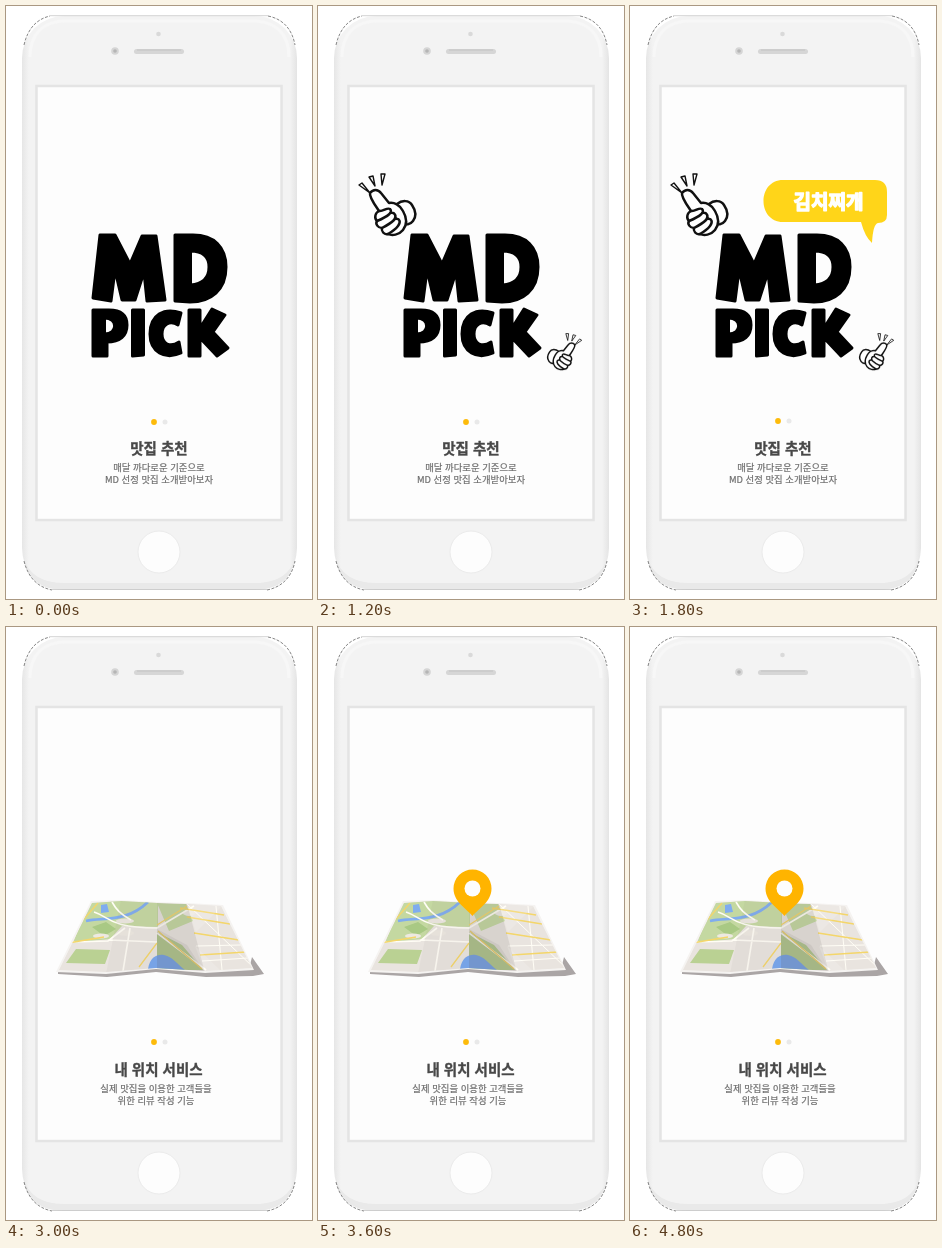
An HTML page for the animation above (5400 ms loop, 306 by 593 pixels).

```html
<!DOCTYPE html>
<html lang="ko">
<head>
<meta charset="utf-8">
<title>MD PICK</title>
<style>
html, body { margin: 0; width: 100%; height: 100%; overflow: hidden; background: #fff; }
svg { display: block; width: 306px; height: 593px; }
text { font-family: "Noto Sans CJK KR", "Noto Sans CJK", sans-serif; text-anchor: middle; stroke-linejoin: round; }
.title { font-size: 14.5px; font-weight: 700; fill: #484848; stroke: #484848; stroke-width: .35px; }
.note { font-size: 9.4px; font-weight: 400; fill: #6c6c6c; stroke: #6c6c6c; stroke-width: .2px; }
.label { font-size: 19px; font-weight: 900; fill: #fff; stroke: #fff; stroke-width: 1.4px; }

/* Nine hard steps of 600 ms */
.pick, .map, .big, .small, .dish, .steak, .pin, .dots { animation: 5400ms step-end infinite; }
.pick { animation-name: pick; }
.map { animation-name: map; }
.big { animation-name: big; }
.small { animation-name: small; }
.dish { animation-name: dish; }
.steak { animation-name: steak; }
.pin { animation-name: pin; }
.dots { animation-name: dots; }
@keyframes pick { 0% { opacity: 1 } 55.5555%, 100% { opacity: 0 } }
@keyframes map { 0% { opacity: 0 } 55.5555%, 100% { opacity: 1 } }
@keyframes big { 0% { opacity: 0 } 11.1111%, 100% { opacity: 1 } }
@keyframes small { 0% { opacity: 0 } 22.2222%, 100% { opacity: 1 } }
@keyframes dish { 0% { opacity: 0 } 33.3333%, 100% { opacity: 1 } }
@keyframes steak { 0% { opacity: 0 } 44.4444%, 100% { opacity: 1 } }
@keyframes pin { 0%, 77.7777% { opacity: 0 } 66.6666%, 88.8888%, 100% { opacity: 1 } }
@keyframes dots { 0% { transform: none } 33.3333%, 100% { transform: translateY(-1px) } }
</style>
</head>
<body>
<svg viewBox="0 0 306 593">
  <defs>
    <linearGradient id="side">
      <stop offset="0" stop-color="#e6e6e6"/>
      <stop offset=".025" stop-color="#f3f3f3"/>
      <stop offset=".975" stop-color="#f3f3f3"/>
      <stop offset="1" stop-color="#e4e4e4"/>
    </linearGradient>
    <g id="thumb" stroke="#111" stroke-width="2.5" fill="#fff" stroke-linejoin="round" stroke-linecap="round">
      <path d="M79 198C84 194 91 194 94 199C98 205 98 211 95 215C92 219 88 219 85 217"/>
      <path d="M61 205C57 199 51 191 52 187C55 183 60 183 63 187L71 197C76 196 82 199 85 205C89 212 89 219 85 224C81 229 74 230 70 228C66 229 63 225 64 222C60 222 57 218 59 215C56 212 57 207 61 205Z"/>
      <path fill="none" d="M61 205C65 206 69 201 72 203C75 206 71 210 59 215M72 207C77 206 79 210 76 214Q72 218 64 222M77 213C82 212 83 216 80 220Q77 224 70 228"/>
      <path stroke-width="1.400" d="M41 179L44 177L52 187ZM51 171L55 170L57 180ZM63 168L67 168L64 179Z"/>
    </g>
    <clipPath id="sheet"><path d="M86 276L115 274L151 276L181 277L215 279L246 341L199 344L150 341L100 345L53 343Z"/></clipPath>
  </defs>

  <g>
    <rect x="16" y="10" width="275" height="574" rx="42" fill="url(#side)"/>
    <path d="M17 544C18 566 34 577 58 577H249C273 577 289 566 290 544C290 570 274 584 249 584H58C33 584 17 570 17 544Z" fill="#e9e9e9"/>
    <path d="M24 51C24 28 37 15 60 15H247C270 15 283 28 283 51" fill="none" stroke="#f7f7f7" stroke-width="3"/>
    <path d="M18 39C22 22 31 13 44 10M262 10C277 13 286 23 289 39M18 555C22 571 31 581 46 584M261 584C276 581 286 571 289 555" fill="none" stroke="#666" stroke-width=".8" stroke-dasharray="3 1.5"/>
    <path d="M44 9.700H262M46 583.500H261" stroke="#c7c7c7" stroke-width=".8"/>
    <circle cx="152.500" cy="28" r="2.300" fill="#d9d9d9"/>
    <circle cx="109" cy="45" r="3.800" fill="#d5d5d5"/>
    <circle cx="109" cy="45" r="1.800" fill="#b5b5b5"/>
    <rect x="128" y="43" width="50" height="5" rx="2.500" fill="#d6d6d6"/>
    <path d="M131 44H175" stroke="#c3c3c3"/>
    <rect x="30.500" y="80" width="245" height="434" fill="#fdfdfd" stroke="#e4e4e4" stroke-width="2.500"/>
    <circle cx="153" cy="546" r="21" fill="#fdfdfd" stroke="#ebebeb"/>
  </g>

  <g class="dots">
    <circle cx="148" cy="416" r="2.900" fill="#fdbb0b"/>
    <circle cx="159" cy="416" r="2.500" fill="#e9e9e9"/>
  </g>

  <g class="pick">
    <g role="img" aria-label="MD PICK" stroke="#000" stroke-width="3" stroke-linejoin="round" fill-rule="evenodd">
      <path d="M94 229H109L124 258L136 230H150L159 294L141 295L138 266L129 294H116L109 264L105 295L87 292Z"/>
      <path d="M169 229H187C208 229 220 241 220 261C220 284 205 296 184 296L169 295ZM184.500 245V279C198 278 203 270 203 261C203 251 197 245 184.500 245Z"/>
      <path d="M87 304H103C116 304 121 310 121 319C121 330 114 336 101 336V350H87ZM98.500 312V328C112 328 112 312 98.500 312Z"/>
      <path d="M126.500 304H137.500V349L126.500 350Z"/>
      <path d="M175 307L172 319C164 314 156 318 156 328C156 338 164 342 173 336L175 347C159 354 144 346 144 328C144 309 158 301 175 307Z"/>
      <path d="M183 304H194V322L206 303L219 309L207 326L222 342L211 350L194 332V350H183Z"/>
    </g>
    <use href="#thumb" class="big"/>
    <g class="small"><use href="#thumb" transform="translate(288 228.500) scale(-.6 .59)"/></g>
    <g class="dish">
      <path d="M153 174H245Q257 174 257 186V209Q257 217 248 217Q243 218 242 237Q235 231 231 216H153C127 216 127 174 153 174Z" fill="#ffd519"/>
      <text class="label" x="198.500" y="202.500">김치찌개</text>
    </g>
    <g class="steak">
      <path d="M65 342Q74 350 77 362H159Q164 362 162 367L153 395Q150 404 140 404H68Q53 404 53 389V376Q53 365 63 362Q67 356 65 342Z" fill="#ebebeb"/>
      <text class="label" x="104" y="391">스테이크</text>
    </g>
    <text class="title" x="153" y="448">맛집 추천</text>
    <text class="note" x="153" y="465">매달 까다로운 기준으로</text>
    <text class="note" x="153" y="477">MD 선정 맛집 소개받아보자</text>
  </g>

  <g class="map">
    <path d="M52 344L100 343L150 340L199 343L244 338L246 330L258 347L247 349L200 350L150 345L101 350L52 347Z" fill="#aaa5a5"/>
    <path d="M85 274L115 273L151 275L181 276L217 278L248 343L199 346L150 342L100 347L50 345Z" fill="#f5f3f1"/>
    <g clip-path="url(#sheet)">
      <path d="M50 270H250V350H50Z" fill="#e9e4df"/>
      <path d="M84 273H152V300L116 299L104 312L67 316Z" fill="#c4d8a1"/>
      <path d="M70 322L104 323L99 337L60 336Z" fill="#bad193"/>
      <path d="M151 276L180 277L187 294L163 304Z" fill="#c4d8a1"/>
      <path d="M151 305L176 318L197 343H151Z" fill="#b6cf91"/>
      <path d="M86 300L100 295L110 302L98 309Z" fill="#a9c984"/>
      <g fill="#ede9e1">
        <ellipse cx="119" cy="294" rx="9" ry="2.500"/>
        <ellipse cx="95" cy="309" rx="8" ry="2.500"/>
        <ellipse cx="120" cy="306" rx="8" ry="3"/>
        <ellipse cx="183" cy="286" rx="6" ry="3"/>
      </g>
      <path d="M80 294C98 290 120 296 142 275" fill="none" stroke="#7facef" stroke-width="2.800"/>
      <path d="M95 278L101 277L103 285L95 286Z" fill="#7facef"/>
      <path d="M142 342C144 330 151 327 158 328C167 330 170 336 179 343Z" fill="#77a7ee"/>
      <g fill="none" stroke="#fffdf5" stroke-width="1.600">
        <path d="M88 285C104 290 103 301 151 301M106 275C110 282 114 287 125 293M64 315L102 314L119 301M103 313L151 315M124 301L117 344M151 301L188 279M151 306L200 343"/>
        <path stroke-width="1" d="M181 277L247 340M190 319L235 318M196 334L242 331M210 279L216 343"/>
      </g>
      <path d="M77 293L92 276M62 316L98 310M133 340L151 316M151 298L181 279M152 304L196 342M174 281L218 288M181 290L224 297M188 306L233 313M194 328L240 325" fill="none" stroke="#f4d66a" stroke-width="1.300"/>
      <path d="M115 273L151 275V342L100 347Z" fill="#776969" opacity=".06"/>
      <path d="M151 275L181 276L199 346L151 342Z" fill="#655b5b" opacity=".13"/>
      <path d="M151 302L181 318L199 346L151 342Z" fill="#655b5b" opacity=".1"/>
      <path d="M190 305L217 278H181ZM189 319L199 346L214 343Z" fill="#fff" opacity=".15"/>
    </g>
    <g class="pin">
      <path fill="#ffb400" d="M154.500 289C148 281 135.500 275 135.500 261.500A19 19 0 0 1 173.500 261.500C173.500 275 161 281 154.500 289Z"/>
      <circle cx="154.500" cy="261.500" r="8" fill="#fdfdfd"/>
    </g>
    <text class="title" x="152.500" y="448">내 위치 서비스</text>
    <text class="note" x="150" y="465">실제 맛집을 이용한 고객들을</text>
    <text class="note" x="150" y="477">위한 리뷰 작성 기능</text>
  </g>
</svg>
</body>
</html>
```
